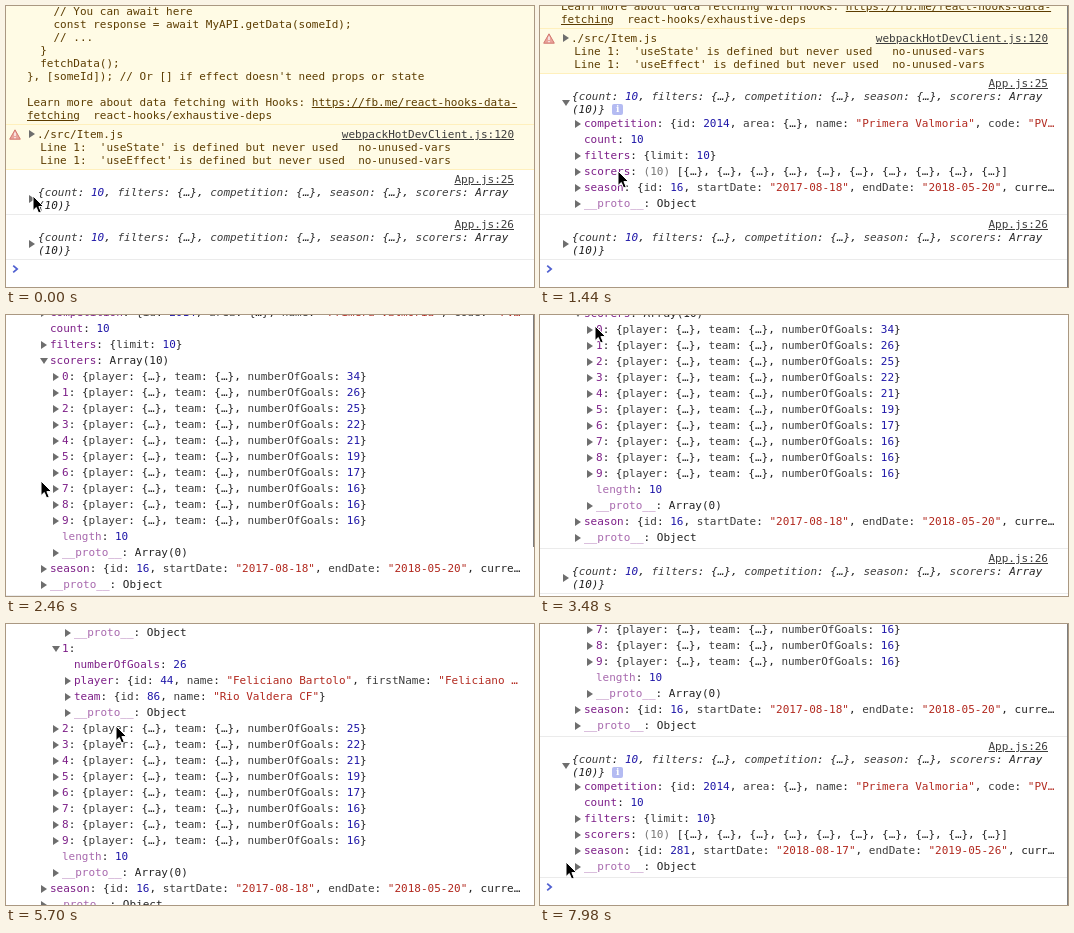
An HTML page that plays this animation: 528x281 px, repeating every 8000 ms.

```html
<!DOCTYPE html>
<html lang="en">
<head>
<meta charset="utf-8">
<title>Console</title>
<style>
html, body { margin: 0; width: 100%; height: 100%; overflow: hidden; background: #fff; }
#stage { position: relative; width: 528px; height: 281px; overflow: hidden; background: #fff;
  font: 11px/13px "DejaVu Sans Mono", monospace; color: #222; white-space: pre; }
#doc { position: absolute; left: 0; top: -1px; width: 528px; }
.warn { position: relative; background: #fffbe5; color: #5c3c00; border-bottom: 1px solid #fff0bd; padding: 0 0 2px 21px; }
.warn + .warn { padding-top: 3px; }
.warn svg { position: absolute; left: 3px; top: 4px; }
.warn .name { padding-left: 10px; }
.link { position: absolute; right: 20px; text-decoration: underline; color: #3c3c3c; }
.log { position: relative; border-bottom: 1px solid #ebebeb; padding: 3px 0 2px; }
.head { position: relative; margin-top: 13px; padding-left: 32px; font-style: italic; }
.row { position: relative; height: 16px; line-height: 16px; }
.tri { position: absolute; width: 6px; height: 8px; background: #6e6e6e; clip-path: polygon(0 0, 100% 50%, 0 100%); }
.open > .row > .tri, .open > .head > .tri { width: 8px; height: 6px; margin: 1px 0 0 -1px; clip-path: polygon(0 0, 100% 0, 50% 100%); }
.node:not(.open) > .kids, .node:not(.open) > .row > .full, .node:not(.open) > .head .badge, .open > .row > .shut { display: none; }
.key { color: #7d1f88; }
.dim { color: #a869ae; }
.n { color: #3c3c3c; }
.d { color: #1f17a8; }
.s { color: #b2291f; }
.g { color: #777; }
.badge { position: absolute; width: 11px; height: 11px; margin: 1px 0 0 7px; border-radius: 2px; background: #b4bbf2;
  color: #fff; font: bold 9px/11px "DejaVu Serif", "Noto Serif", serif; text-align: center; }
.prompt { display: block; margin: 4px 0 0 6px; }
#thumb { position: absolute; left: 527px; top: 0; width: 1px; background: #7d7d7d; }
#tip { position: absolute; left: 86px; top: 207px; box-sizing: border-box; width: 70px; height: 23px; border: 1px solid #d6d6d6;
  background: #f6f6f6; font: 11px/16px "Liberation Sans", Arial, sans-serif; text-align: center; }
#mouse { position: absolute; left: 0; top: 0; overflow: visible; }
</style>
</head>
<body>
<div id="stage">
  <div id="doc"></div>
  <div id="tip">__proto__</div>
  <div id="thumb"></div>
  <svg id="mouse" width="12" height="18"><path d="M0 0V14.6L3.3 11.5 5.6 17 8.2 15.9 5.9 10.6H10.6Z" fill="#000" stroke="#fff" stroke-linejoin="round"/></svg>
</div>
<script>
const $ = id => document.getElementById(id);
const STEP = 60, LOOP = 8000, VIEW = 281, PANE = 585;

// ---- console content ----
const paint = text => text.replace(/("[^"]*"?)|(\w+)(?=:)|\b(\d+)\b(?!\))/g, (m, s, n) =>
  `<span class="${s ? 's' : n ? 'n' : 'd'}">${m}</span>`);

const tri = (x, y) => `<i class="tri" style="left:${x}px;top:${y}px"></i>`;

function row(level, key, value, { arrow = true, dim = false } = {}) {
  const x = 32 + 12 * level;
  return `<div class="row" style="padding-left:${x}px">${arrow ? tri(x - 9, 4) : ''}` +
    `<span class="${dim ? 'dim' : 'key'}">${key}</span>: ${value}</div>`;
}
const leaf = (level, key, value, dim) => row(level, key, paint(value), { arrow: false, dim });
const proto = (level, value = 'Object') => row(level, '__proto__', value, { dim: true });

const node = (id, level, key, shut, full, kids) =>
  `<div class="node" id="${id}">${row(level, key, `<span class="shut">${shut}</span><span class="full">${full}</span>`)}` +
  `<div class="kids">${kids}</div></div>`;

const listPreview = `<span class="g">(10)</span> [${Array(10).fill('{…}').join(', ')}]`;
const itemPreview = goals => paint(`{player: {…}, team: {…}, numberOfGoals: ${goals}}`);

const details = [
  ['{id: 61, name: "Tomas Ferrando", firstName: "Tomas", lastN…', '{id: 81, name: "CD Monteluz"}'],
  ['{id: 44, name: "Feliciano Bartolo", firstName: "Feliciano …', '{id: 86, name: "Rio Valdera CF"}']
];

const items = [34, 26, 25, 22, 21, 19, 17, 16, 16, 16].map((goals, i) => {
  if (!details[i]) return row(2, i, itemPreview(goals));
  const [player, team] = details[i];
  return node('item' + i, 2, i, itemPreview(goals), '',
    leaf(3, 'numberOfGoals', String(goals)) + row(3, 'player', paint(player)) +
    row(3, 'team', paint(team)) + proto(3));
}).join('');

function log(id, line, scorers, season) {
  return `<div class="log node" id="${id}"><span class="link">App.js:${line}</span>` +
    `<div class="head">${tri(23, 9)}` +
    paint('{count: 10, filters: {…}, competition: {…}, season: {…}, scorers: Array') +
    `\n(10)}<span class="badge">i</span></div><div class="kids">` +
    row(1, 'competition', paint('{id: 2014, area: {…}, name: "Primera Valmoria", code: "PV…')) +
    leaf(1, 'count', '10') + row(1, 'filters', paint('{limit: 10}')) + scorers +
    row(1, 'season', paint(season)) + proto(1) + '</div></div>';
}

const hint = `    // You can await here
    const response = await MyAPI.getData(someId);
    // ...
  }
  fetchData();
}, [someId]); // Or [] if effect doesn't need props or state

Learn more about data fetching with Hooks: <u>https://fb.me/react-hooks-data-</u>
<u>fetching</u>  react-hooks/exhaustive-deps`;

const lint = `<svg width="12" height="11"><path d="M6 .8L11.3 10.2H.7Z" fill="#e9a49c" stroke="#d2766e" stroke-linejoin="round"/><path d="M6 3.6V7M6 8V9.2" stroke="#fff" stroke-width="1.3"/></svg>` +
  tri(23, 5) + `<span class="link">webpackHotDevClient.js:120</span><span class="name">./src/Item.js</span>
  Line 1:  'useState' is defined but never used   no-unused-vars
  Line 1:  'useEffect' is defined but never used  no-unused-vars`;

$('doc').innerHTML = `<div class="warn">${hint}</div><div class="warn">${lint}</div>` +
  log('first', 25,
    node('scorers', 1, 'scorers', listPreview, 'Array(10)', items + leaf(2, 'length', '10', true) + proto(2, 'Array(0)')),
    '{id: 16, startDate: "2017-08-18", endDate: "2018-05-20", curre…') +
  log('second', 26, row(1, 'scorers', listPreview),
    '{id: 281, startDate: "2018-08-17", endDate: "2019-05-26", curr…') +
  '<svg class="prompt" width="8" height="10"><path d="M1.2 1.6L5.2 5 1.2 8.4" fill="none" stroke="#4f5fd0" stroke-width="1.7"/></svg>';

// ---- timeline ----
const clicks = { first: 240, scorers: 1680, item0: 3540, item1: 3780, second: 7560 };

// moves: begin, end, destination
const scrolls = [[750, 1140, 96], [1680, 2040, 205], [2280, 2940, 263], [3780, 4080, 333], [6720, 7080, 416], [7560, 7920, 512]];
const glides = [[300, 780, 78, 165], [1440, 1660, 35, 166], [2640, 3480, 55, 11], [3540, 3720, 48, 92], [4140, 4920, 50, 40],
  [5460, 5700, 110, 102], [6000, 6180, 58, 139], [6720, 7020, 86, 187], [7080, 7200, 37, 240], [7320, 7500, 26, 238]];

const clamp = p => Math.min(1, Math.max(0, p));
const smooth = p => p * p * (3 - 2 * p);
const fade = (t, begin) => 1 - clamp((t - begin) / 240);

// Each move eases from wherever the previous one ended.
const follow = (moves, from, t) => moves.reduce((pos, [begin, end, ...to]) => {
  const p = smooth(clamp((t - begin) / (end - begin)));
  return pos.map((v, i) => v + (to[i] - v) * p);
}, from).map(Math.round);

const baseHeight = $('doc').offsetHeight;

function render(now) {
  const t = Math.floor((now % LOOP) / STEP) * STEP;
  for (const id in clicks) $(id).classList.toggle('open', t >= clicks[id]);

  const [y] = follow(scrolls, [0], t);
  $('doc').style.transform = `translateY(${-y}px)`;

  // The scroll bar shows during a scroll and fades shortly after it.
  const height = $('doc').offsetHeight, below = height - baseHeight - y;
  const last = scrolls.findLast(move => move[0] <= t);
  $('thumb').style.height = VIEW - below * PANE / (height + PANE - VIEW) + 'px';
  $('thumb').style.opacity = last ? fade(t, last[1] + 300) : 0;

  $('tip').style.opacity = t < 7080 ? 0 : fade(t, 7080) * 0.5;

  const [mx, my] = follow(glides, [27, 190], t);
  $('mouse').style.transform = `translate(${mx}px,${my}px)`;
}

const start = performance.now();
function tick() {
  render(performance.now() - start);
  requestAnimationFrame(tick);
}
tick();
</script>
</body>
</html>
```
